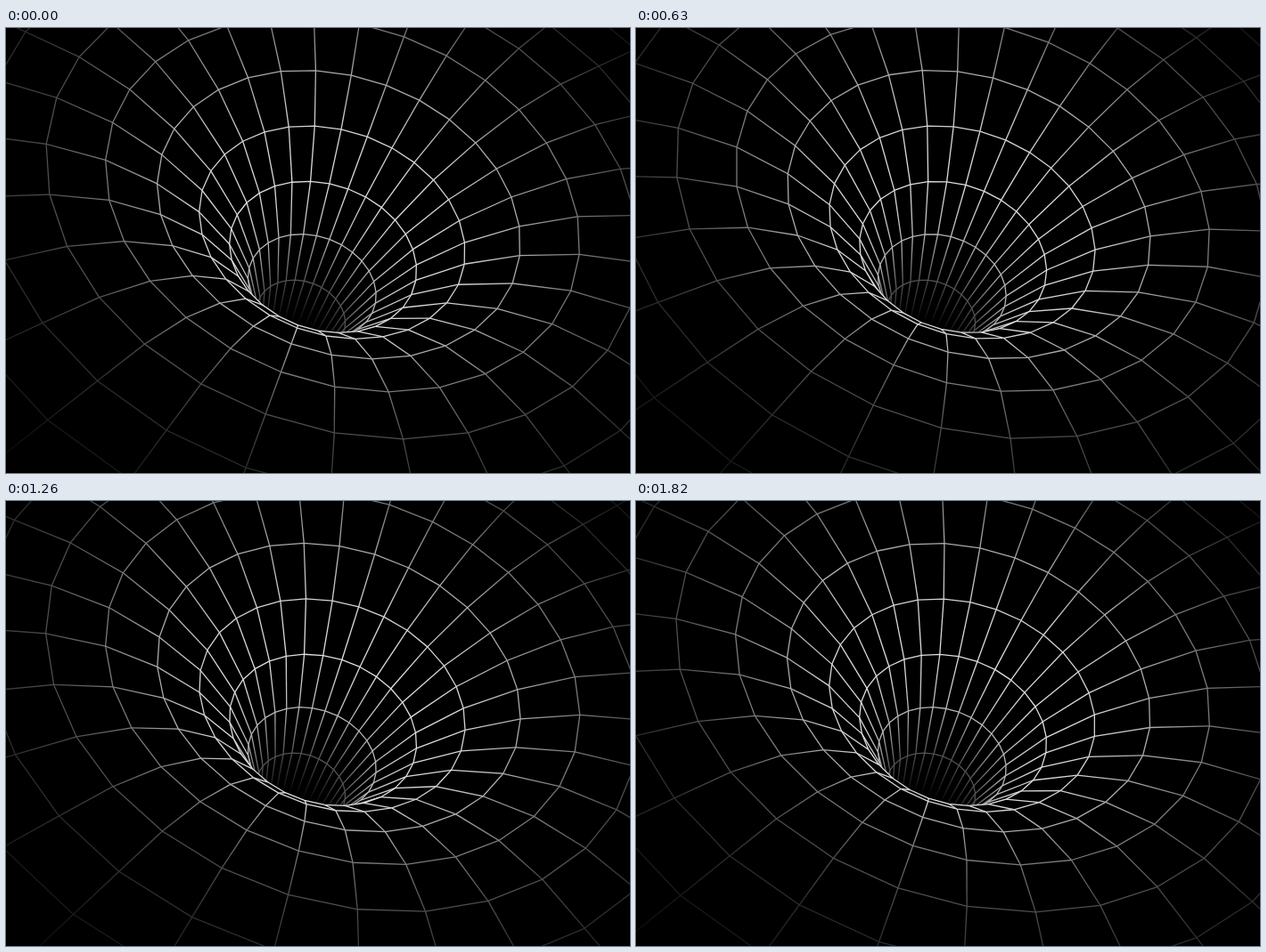
These frames come from a looping animation (700x500 px, 1890 ms). An HTML page with a canvas:

```html
<!DOCTYPE html>
<html lang="en">
<head>
<meta charset="utf-8">
<title>Gravity well</title>
<style>
html, body { margin: 0; width: 100%; height: 100%; overflow: hidden; background: #000; }
canvas { display: block; width: 700px; height: 500px; }
</style>
</head>
<body>
<canvas id="stage" width="700" height="500"></canvas>
<script>
const ctx = document.getElementById('stage').getContext('2d');
const RAD = Math.PI / 180;
const SPOKES = 30, STEP = 360 / SPOKES, PHASE = 0.25;
const FRAME = 70, FRAMES = 27;

// camera: focal length, elevation (sin, cos), roll, sideways offset of the axis
const FOCAL = 1960, SE = 0.755, CE = 0.656, OFFSET = 7.8;
const CR = Math.cos(20 * RAD), SR = Math.sin(20 * RAD);

// funnel profile from the throat outwards: radius, height, grey level
const RINGS = [
  [41.5, -185, 4], [53.4, -121, 82], [75.5, -61, 182], [107.9, -3.1, 222],
  [150.5, 45.6, 212], [202.4, 83.7, 170], [261, 111.5, 122],
  [324, 125, 78], [389, 126, 46], [454, 126, 26], [519, 126, 8]
];

const grey = v => `rgb(${v},${v},${v})`;

function project(r, h, deg) {
  const far = r * Math.cos(deg * RAD);
  const k = FOCAL / (FOCAL - SE * h + CE * far);
  const x = k * (OFFSET + r * Math.sin(deg * RAD));
  const y = k * (-CE * h - SE * far);
  return [350 + x * CR - y * SR, 250 + x * SR + y * CR];
}

function path(points, close) {
  ctx.beginPath();
  points.forEach(p => ctx.lineTo(p[0], p[1]));
  if (close) ctx.closePath();
}

// each strip covers what lies behind it, then gets its own lines
function strip(inner, outer, shadeIn, shadeOut, drawRing) {
  ctx.fillStyle = '#000';
  for (let i = 0; i < SPOKES; i++) {
    const j = (i + 1) % SPOKES;
    path([inner[i], inner[j], outer[j], outer[i]], true);
    ctx.fill();
  }
  for (let i = 0; i < SPOKES; i++) {
    const g = ctx.createLinearGradient(...inner[i], ...outer[i]);
    g.addColorStop(0, grey(shadeIn));
    g.addColorStop(1, grey(shadeOut));
    ctx.strokeStyle = g;
    path([inner[i], outer[i]]);
    ctx.stroke();
  }
  if (drawRing) {
    ctx.strokeStyle = grey(shadeIn);
    path(inner, true);
    ctx.stroke();
  }
}

function draw(turn) {
  ctx.fillStyle = '#000';
  ctx.fillRect(0, 0, 700, 500);
  ctx.lineWidth = 1.3;
  ctx.lineJoin = 'round';
  const rings = RINGS.map(([r, h]) =>
    Array.from({ length: SPOKES }, (_, i) => project(r, h, PHASE + STEP * (i + turn))));
  for (let n = 0; n + 1 < rings.length; n++) {
    strip(rings[n], rings[n + 1], RINGS[n][2], RINGS[n + 1][2], n > 0);
  }
}

function tick() {
  draw(Math.floor(performance.now() / FRAME) % FRAMES / FRAMES);
  requestAnimationFrame(tick);
}
tick();
</script>
</body>
</html>
```
